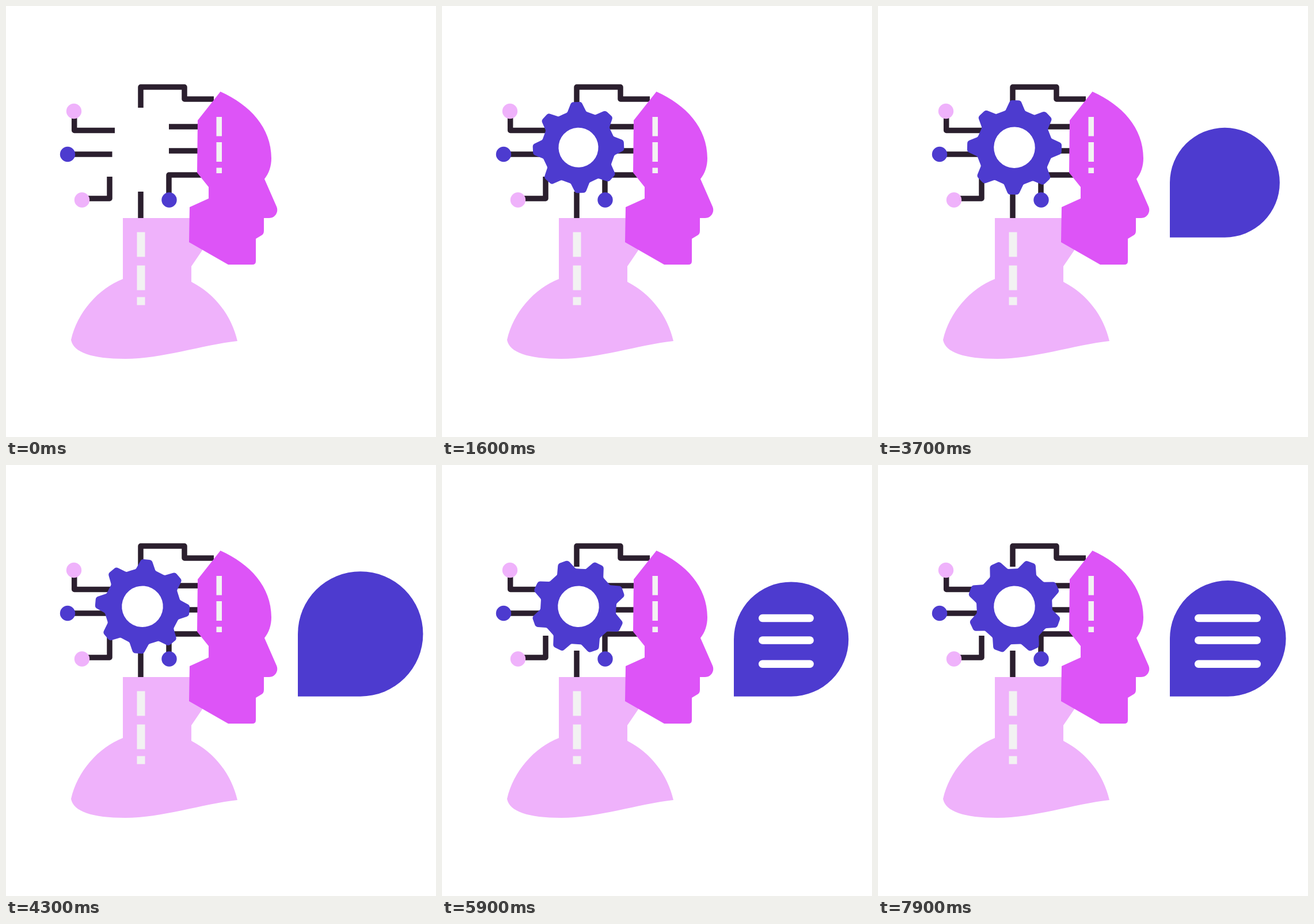
Animation of 747 by 750 pixels, one loop 8 s. Source, as an HTML page with a canvas:

```html
<!DOCTYPE html>
<html lang="en">
<head>
<meta charset="utf-8">
<title>Thinking head</title>
<style>
html, body { margin: 0; width: 100%; height: 100%; overflow: hidden; background: #fff; }
canvas { display: block; }
</style>
</head>
<body>
<canvas id="stage" width="747" height="750"></canvas>
<script>
const ctx = document.getElementById('stage').getContext('2d');
const LOOP = 8000, STEP = 100;
const BLUE = '#4d3bcf', PINK = '#efb2fb', MAGENTA = '#dd54f7', DARK = '#2b1f2e', PALE = '#f2f2f2';

const body = new Path2D('M203 369H341V425L322 453V480C363 501 392 539 402 583' +
  'C340 590 270 614 207 614C150 614 117 603 113 581C124 533 160 492 203 475Z');
const head = new Path2D('M372.5 149C424 172 461 212 461 265C461 278 457 291 449 301L470 349' +
  'C474 358 468 369 457 369H448V391Q448 397 444 399L434 405V444Q434 450 428 450H386' +
  'L318 411L319 350L352 335V315L332 290L333 199Z');
const wires = new Path2D('M234 177V141H310V162H361M118.7 190V216.5H189M107 258H184.5' +
  'M132 335H180V297M234 323V369M283 210H336M283 252H336M283 337V294H342');
const dots = [[118, 183, PINK], [107, 258, BLUE], [132, 337.5, PINK], [283.5, 337.5, BLUE]];
const gear = makeGear();

const clamp = x => Math.min(1, Math.max(0, x));
const part = (t, from, to) => clamp((t - from) / (to - from));
const easeOut = (p, n) => 1 - Math.pow(1 - p, n);
const sine = p => (1 - Math.cos(Math.PI * p)) / 2;

function makeGear() {
  const path = new Path2D();
  // one tooth as [x, y, corner radius], repeated every 45 degrees
  const tooth = [[-17, -64, 4], [-9, -82, 6], [9, -82, 6], [17, -64, 4]];
  const pts = [];
  for (let i = 0; i < 8; i++) {
    const c = Math.cos(i * Math.PI / 4), s = Math.sin(i * Math.PI / 4);
    for (const [x, y, r] of tooth) pts.push([x * c - y * s, x * s + y * c, r]);
  }
  const last = pts[pts.length - 1];
  path.moveTo((last[0] + pts[0][0]) / 2, (last[1] + pts[0][1]) / 2);
  pts.forEach(([x, y, r], i) => {
    const next = pts[(i + 1) % pts.length];
    path.arcTo(x, y, next[0], next[1], r);
  });
  path.closePath();
  path.moveTo(35.8, 0);
  path.arc(0, 0, 35.8, 0, Math.PI * 2);
  return path;
}

function fill(path, color) {
  ctx.fillStyle = color;
  ctx.fill(path);
}

function drawBars(x, w, rows) {
  ctx.fillStyle = PALE;
  for (const [y, h] of rows) ctx.fillRect(x, y, w, h);
}

function drawGear(t) {
  const grow = easeOut(part(t, 0, 2700), 3.75);
  if (!grow) return;
  const turn = 60 * (1 - Math.cos(0.000345 * Math.max(0, t - 3100)));
  const angle = turn - 78 * (1 - grow);
  ctx.save();
  ctx.translate(237, 246.2);
  ctx.rotate(angle * Math.PI / 180);
  ctx.scale(grow, grow);
  ctx.fillStyle = BLUE;
  ctx.fill(gear, 'evenodd');
  ctx.restore();
}

function bubbleSize(t) {
  if (t < 4450) return 218 * easeOut(part(t, 2700, 4450), 2.46);
  if (t < 4950) return 218 - 21.8 * sine(part(t, 4450, 4950));
  return 196.2 + 5.4 * sine(part(t, 4950, 6700));
}

function drawBubble(t) {
  const size = bubbleSize(t), r = size / 2, x = 507, y = 402.7;
  if (size <= 0) return;
  ctx.fillStyle = BLUE;
  ctx.beginPath();
  ctx.moveTo(x, y);
  ctx.lineTo(x, y - r);
  ctx.arc(x + r, y - r, r, Math.PI, Math.PI * 2.5);
  ctx.closePath();
  ctx.fill();

  const w = 115 * easeOut(part(t, 5000, 7000), 3);
  if (!w) return;
  ctx.fillStyle = '#fff';
  for (const cy of [266.5, 305, 346.3]) {
    ctx.beginPath();
    ctx.roundRect(550, cy - 6.7, w, 13.4, Math.min(6.7, w / 2));
    ctx.fill();
  }
}

function draw(t) {
  ctx.fillStyle = '#fff';
  ctx.fillRect(0, 0, 747, 750);

  ctx.strokeStyle = DARK;
  ctx.lineWidth = 9.5;
  ctx.lineJoin = 'round';
  ctx.stroke(wires);
  for (const [x, y, color] of dots) {
    ctx.fillStyle = color;
    ctx.beginPath();
    ctx.arc(x, y, 13.2, 0, Math.PI * 2);
    ctx.fill();
  }

  fill(body, PINK);
  fill(head, MAGENTA);
  drawBars(365.5, 9.5, [[193, 33.5], [237, 34], [281.5, 9.5]]);
  drawBars(227.5, 14, [[393.5, 43], [451.5, 43], [506.5, 14]]);
  drawGear(t);
  drawBubble(t);
}

const start = performance.now();
function frame() {
  const t = (performance.now() - start) % LOOP;
  draw(Math.floor(t / STEP) * STEP);
  requestAnimationFrame(frame);
}
frame();
</script>
</body>
</html>
```
